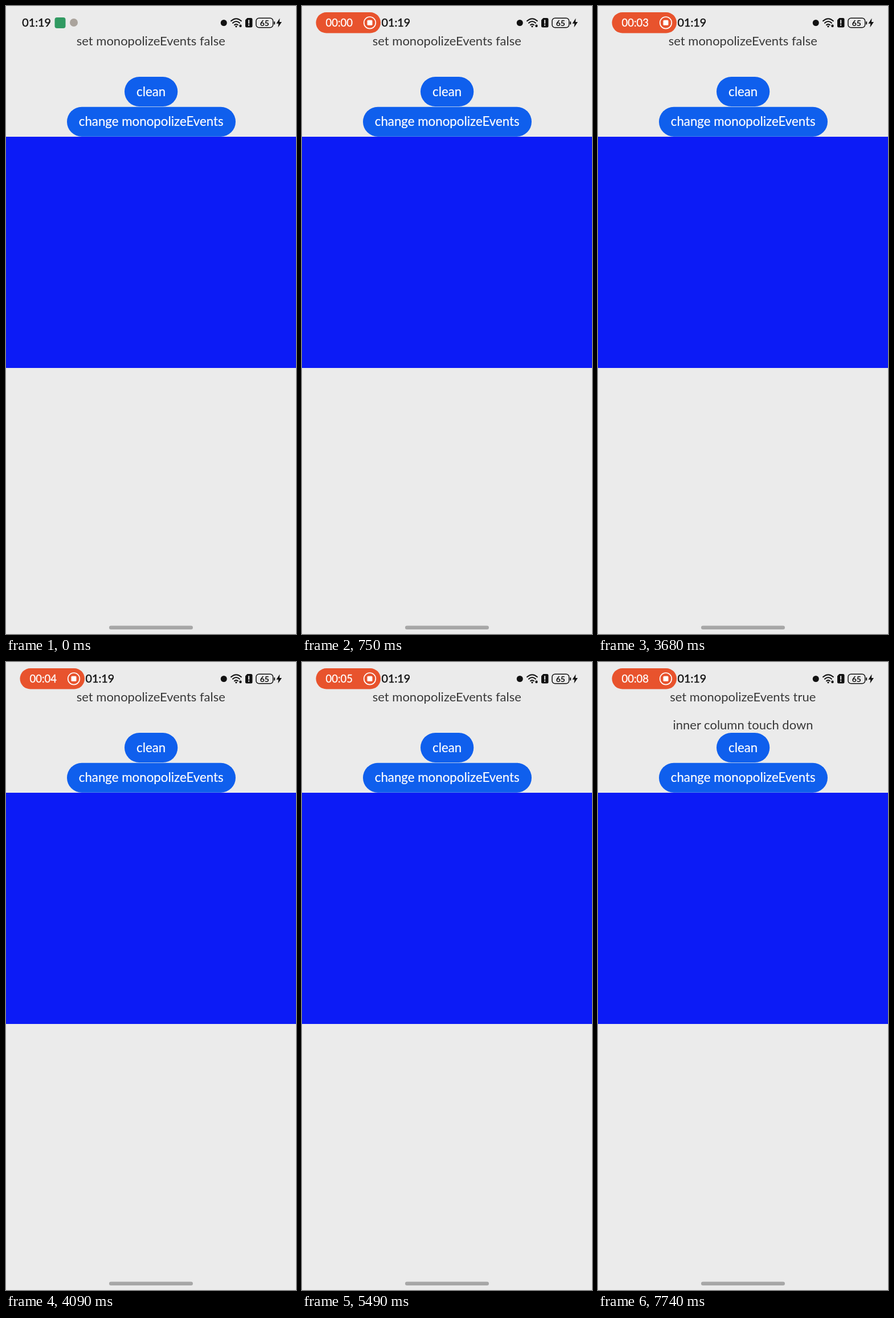
An HTML page that plays this animation: 509x1100 px, repeating every 8 s.

```html
<!DOCTYPE html>
<html lang="en">
<head>
<meta charset="utf-8">
<title>Touch event demo</title>
<style>
  html, body { margin: 0; width: 100%; height: 100%; overflow: hidden; background: #ebebeb; }
  svg { display: block; width: 100%; height: 100%; font-family: Lato, "Open Sans", sans-serif; }
  .mid { text-anchor: middle; }
  .line { font-size: 22px; fill: #383838; }
  .label { font-size: 22.3px; fill: #fff; stroke: #fff; stroke-width: .2px; }
  .clock { font-size: 19.7px; fill: #111; stroke: #111; stroke-width: .4px; }
  .timer { font-size: 18.5px; fill: #fff; stroke: #fff; stroke-width: .3px; }
  .level { font-size: 14px; font-weight: 700; fill: #111; }
</style>
</head>
<body>
<svg viewBox="0 0 509 1100">
  <rect width="509" height="1100" fill="#ebebeb"/>
  <rect y="229" width="509" height="405" fill="#0c1bf6"/>
  <rect x="181" y="1085.5" width="147" height="6.5" rx="3.2" fill="#a7a7a7"/>

  <g id="apps">
    <rect x="85.5" y="20" width="19" height="19" rx="4" fill="#319a62"/>
    <circle cx="119" cy="29" r="7" fill="#aaa39c"/>
  </g>
  <g id="pill">
    <rect id="pillBox" x="24.5" y="11" width="113.5" height="36.5" rx="18.25" fill="#e8532d"/>
    <g id="pillBody">
      <text id="timer" class="timer" x="41.5" y="35.7">00:00</text>
      <circle cx="119" cy="29.3" r="10.3" fill="none" stroke="#fff" stroke-width="1.7"/>
      <rect x="114.5" y="24.8" width="9" height="9" rx="1.6" fill="#fff"/>
    </g>
  </g>
  <text id="clock" class="clock" y="36">01:19</text>

  <g fill="#111">
    <circle cx="382.3" cy="29.5" r="5.5"/>
    <g fill="none" stroke="#111" stroke-width="2" stroke-linecap="round">
      <path d="M395 26.2Q404 18.2 413 26.2M398 29.8Q404 24.3 410 29.8M401 33.2Q404 30.8 407 33.2"/>
    </g>
    <circle cx="404" cy="35.8" r="1.6"/>
    <rect x="409.5" y="32.5" width="4" height="4.5" rx="1.5"/>
    <path d="M423.5 21H430a2.5 2.5 0 0 1 2.5 2.5V35a2.5 2.5 0 0 1-2.5 2.5H422.5A2.5 2.5 0 0 1 420 35V24.500Z"/>
    <path d="M426.2 25v5.300M426.2 33v1" stroke="#ebebeb" stroke-width="2" stroke-linecap="round"/>
    <rect x="439" y="21.300" width="29.700" height="16.500" rx="5" fill="none" stroke="#111" stroke-width="1.500"/>
    <text class="level mid" x="453.800" y="34.600">65</text>
    <rect x="470.200" y="27" width="2" height="5.500" rx="1"/>
    <path d="M480.500 21.500L474.500 30.700H478.300L477.500 37.500L484 28H480Z"/>
  </g>

  <text id="state" class="line mid" x="254.300" y="69.300"></text>
  <text id="touch" class="line mid" x="254.500" y="118.300">inner column touch down</text>
  <rect id="clean" x="208" y="124" width="93.300" height="52" rx="26"/>
  <text class="label mid" x="254.600" y="157.500">clean</text>
  <rect id="change" x="107" y="176.700" width="296" height="52" rx="26"/>
  <text class="label mid" x="254.700" y="210">change monopolizeEvents</text>
</svg>
<script>
const LOOP = 8000;
const $ = id => document.getElementById(id);
const set = (id, name, value) => $(id).setAttribute(name, value);
const clamp = v => Math.max(0, Math.min(1, v));
const between = (t, a, b) => t >= a && t < b;

const ticks = [1030, 2090, 3020, 4090, 5010, 5820, 6150, 7140];
const touches = [[4350, 5340], [6480, 7410], [7740, LOOP]];

// Darkens while held, with a short ramp on both sides.
function press(id, t, holds, ramp) {
  const k = Math.max(...holds.map(([a, b]) =>
    Math.min(clamp((t - a) / ramp + .5), clamp((b - t) / ramp + .5))));
  const mix = (from, to) => Math.round(from + (to - from) * k);
  set(id, "fill", `rgb(${mix(15, 13)},${mix(95, 84)},${mix(237, 212)})`);
}

function draw(t) {
  const p = 1 - (1 - clamp((t - 70) / 550)) ** 3;
  set("apps", "opacity", clamp(1 - p * 3));
  set("pill", "opacity", clamp(p * 3));
  set("pillBox", "width", 36.5 + 77 * p);
  set("pillBody", "opacity", clamp(p * 3 - 2));
  set("clock", "x", 28.3 + 111.3 * p);

  $("timer").textContent = "00:0" + ticks.filter(at => t >= at).length;
  $("state").textContent = "set monopolizeEvents " + (t >= 5890);
  set("touch", "visibility", touches.some(([a, b]) => between(t, a, b)) ? "visible" : "hidden");
  press("clean", t, [[5200, 5400], [7340, 7470]], 80);
  press("change", t, [[5820, 5890]], 20);
}

const start = performance.now();
function frame() {
  draw((performance.now() - start) % LOOP);
  requestAnimationFrame(frame);
}
frame();
</script>
</body>
</html>
```
